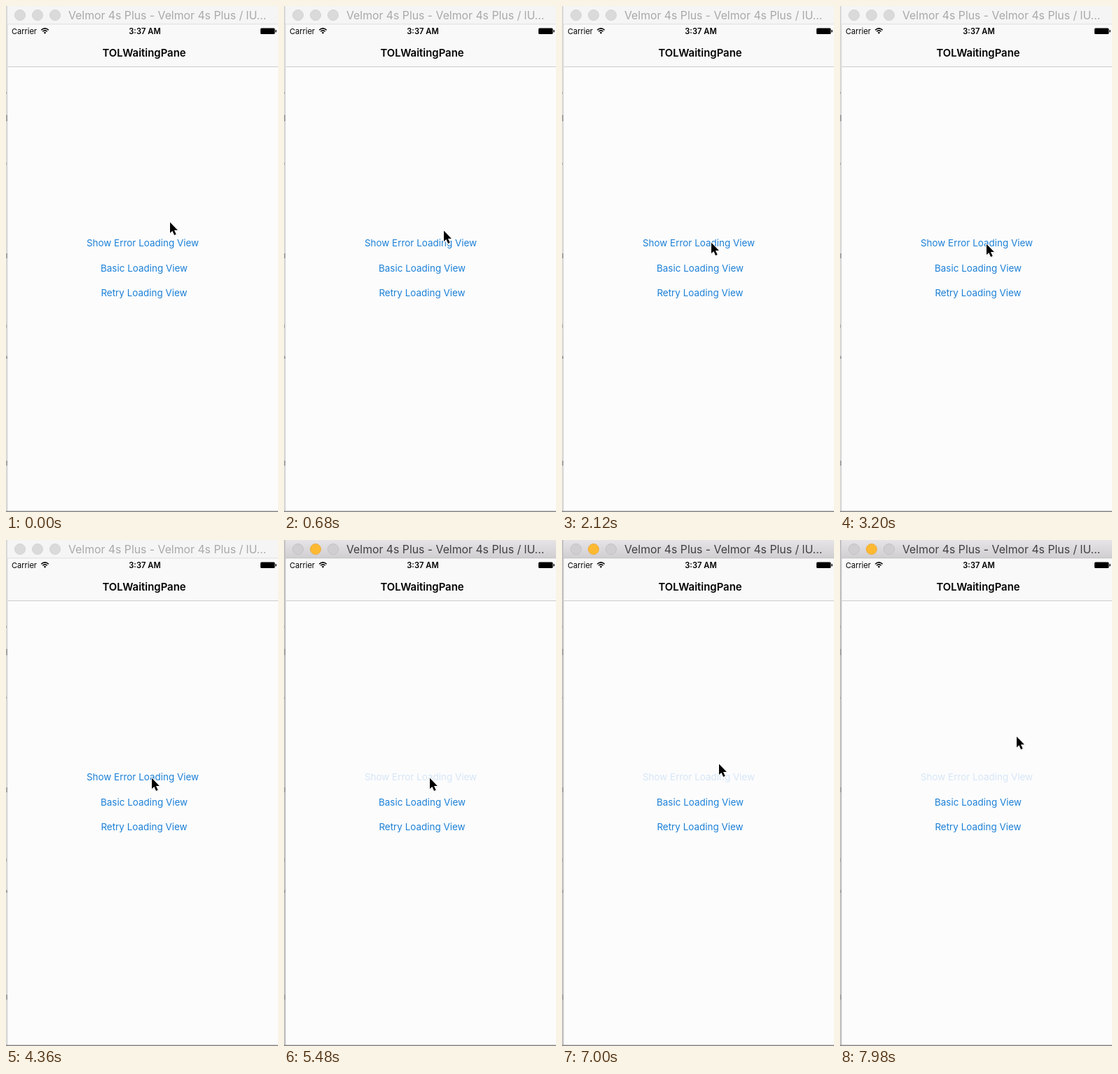
An HTML page for the animation above (8000 ms loop, 388x720 px).

```html
<!DOCTYPE html>
<html lang="en">
<head>
<meta charset="utf-8">
<title>Loading view demo</title>
<style>
  html, body { margin: 0; width: 100%; height: 100%; overflow: hidden; background: #fcfcfd; }
  svg { display: block; width: 388px; height: 720px; font-family: Inter, Roboto, sans-serif; }
  .edge { fill: #d8d8d6; }
  .bar { fill: #f5f5f5; }
  .light { fill: #dadada; stroke: #d0d0d0; stroke-width: .8; }
  .caption { font-size: 15.8px; fill: #a9a9a9; }
  .button { font-size: 13.45px; fill: #1c80d6; text-anchor: middle; }
  .active .edge { fill: #c2c1c2; }
  .active .bar { fill: url(#activeBar); }
  .active .light { fill: #d0ced0; stroke: #bfbdbf; }
  .active .minimise { fill: #fdb932; stroke: #eaa83a; }
  .active .caption { fill: #414041; }
  .active .first { fill: #d6e6f6; }
</style>
</head>
<body>
<svg id="stage" viewBox="0 0 388 720">
  <defs>
    <linearGradient id="activeBar" x2="0" y2="1">
      <stop stop-color="#e6e4e6"/><stop offset="1" stop-color="#d0ced0"/>
    </linearGradient>
    <path id="arrow" d="M0 0V15.2L3.4 12.2L6.1 18.2L8.7 17L6 11.2H10.9Z"/>
  </defs>

  <rect width="388" height="720" fill="#fcfcfd"/>
  <rect class="edge" width="2.5" height="720"/>
  <g fill="#a5a5a5">
    <rect y="122" width="1" height="3"/><rect y="155" width="2" height="9"/>
    <rect y="223" width="1" height="3"/><rect y="352" width="2" height="7"/>
    <rect y="453" width="1" height="5"/><rect y="498" width="2" height="4"/>
    <rect y="647" width="2" height="7"/>
  </g>
  <rect y="718.5" width="388" height="1.5" fill="#858585"/>

  <!-- window bar -->
  <rect class="bar" x="2" width="386" height="26"/>
  <rect class="edge" x="2" y="25.5" width="386" height="1"/>
  <circle class="light" cx="20" cy="13" r="7.6"/>
  <circle class="light minimise" cx="45" cy="13" r="7.6"/>
  <circle class="light" cx="70" cy="13" r="7.6"/>
  <text class="caption" x="89" y="19">Velmor 4s Plus - Velmor 4s Plus / lU...</text>

  <!-- status and navigation bars -->
  <rect x="3" y="26.5" width="385" height="60" fill="#f9f9f9"/>
  <rect x="3" y="86" width="385" height="1" fill="#cdcdcd"/>
  <text x="8" y="40" font-size="11">Carrier</text>
  <g fill="none" stroke="#000" stroke-width="1.5">
    <path d="M50.2 34.2Q55.5 29.6 60.8 34.2M52.2 36.3Q55.5 33.4 58.8 36.3"/>
  </g>
  <path d="M53.7 37.7Q55.5 36.3 57.3 37.7L55.5 39.8Z"/>
  <text x="198" y="40" font-size="11.2" font-weight="600" text-anchor="middle">3:37 AM</text>
  <rect x="363" y="31.5" width="20.5" height="8.5" rx="1.5"/>
  <rect x="384.3" y="34" width="1.5" height="3.5" rx=".7"/>
  <text x="197" y="71.5" font-size="14.9" font-weight="600" text-anchor="middle">TOLWaitingPane</text>

  <text class="button first" x="195" y="342">Show Error Loading View</text>
  <text class="button" x="197" y="377.5">Basic Loading View</text>
  <text class="button" x="197" y="413">Retry Loading View</text>

  <g id="cursor" stroke-linejoin="round">
    <use href="#arrow" x=".5" y="1.5" fill="#e6e6e6" stroke="#f0f0f0" stroke-width="2.2"/>
    <use href="#arrow" y=".8" stroke="#fff" stroke-width="1.4" paint-order="stroke"/>
  </g>
</svg>
<script>
  const LOOP = 8000;
  const PRESS = 4940;
  // time, x and y of the pointer tip
  const path = [
    [0, 234, 307], [1240, 223, 328], [2400, 210, 338], [3200, 209, 338],
    [3700, 208, 338], [5800, 208, 338], [7000, 224, 318], [7980, 252, 279], [LOOP, 252, 279]
  ];
  const stage = document.getElementById('stage');
  const cursor = document.getElementById('cursor');

  function pointerAt(time) {
    const next = path.findIndex(point => point[0] > time);
    const [t0, x0, y0] = path[next - 1];
    const [t1, x1, y1] = path[next];
    const k = (time - t0) / (t1 - t0);
    return [x0 + (x1 - x0) * k, y0 + (y1 - y0) * k].map(Math.round);
  }

  function draw() {
    const time = performance.now() % LOOP;
    stage.classList.toggle('active', time >= PRESS);
    cursor.setAttribute('transform', `translate(${pointerAt(time)})`);
    requestAnimationFrame(draw);
  }
  draw();
</script>
</body>
</html>
```
